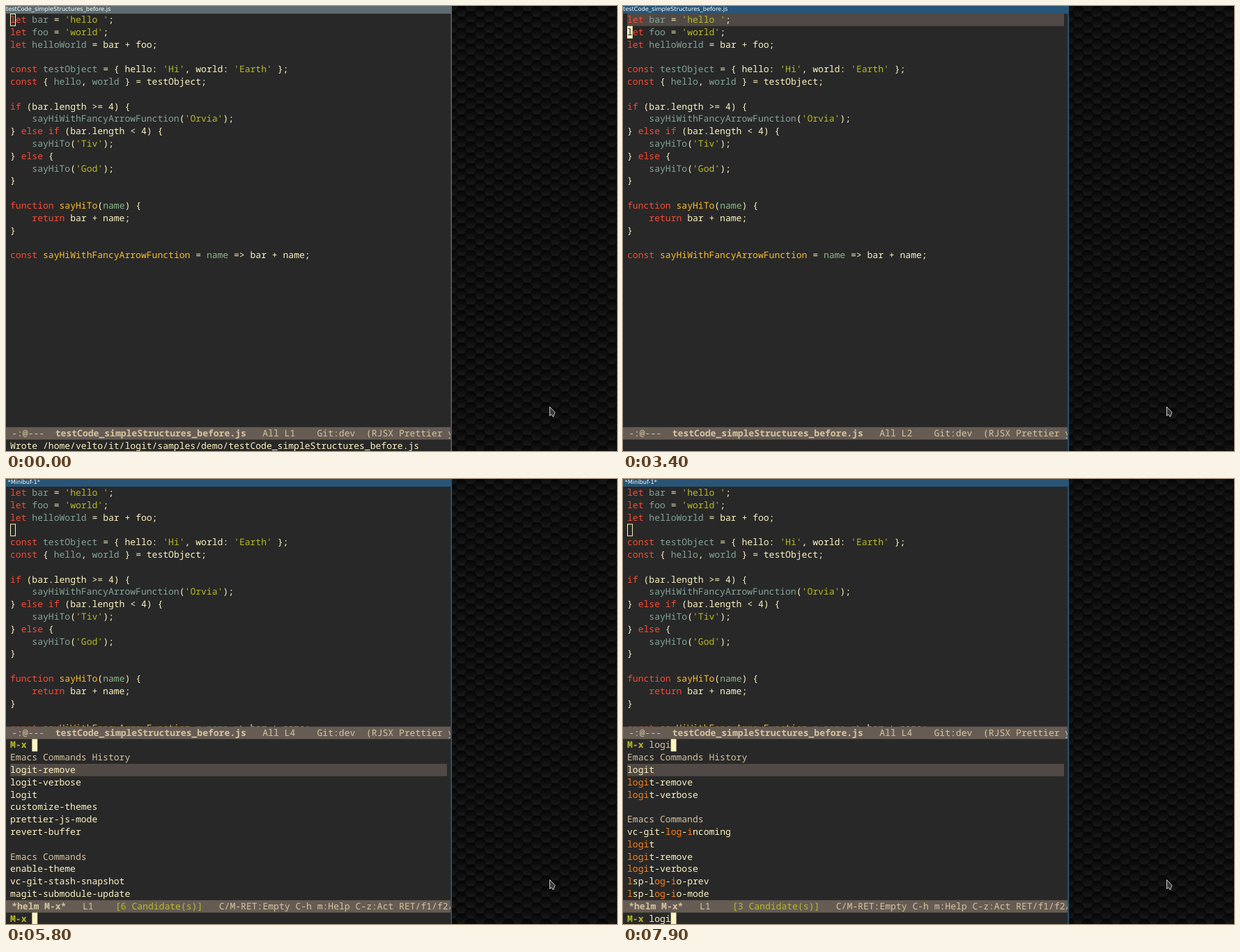
Write an HTML page that moves like this. It is 877x639 px and loops after 8000 ms.

```html
<!DOCTYPE html>
<html lang="en">
<head>
<meta charset="utf-8">
<title>Editor session</title>
<style>
  html, body { margin: 0; width: 100%; height: 100%; overflow: hidden; background: #282828; }
  svg { display: block; width: 877px; height: 639px; }
  text { font: 13.055px "Noto Sans Mono", monospace; fill: #fdf4c1; white-space: pre; text-rendering: geometricPrecision; }
  .title { font: 8.22px "DejaVu Sans", sans-serif; fill: #fff; }
  .k { fill: #fb4933; }
  .v { fill: #83a598; }
  .s { fill: #b8bb26; }
  .f { fill: #fabd2f; }
  .p { fill: #8db885; }
  .m { fill: #fe8019; }
  .dim { fill: #d5c4a1; }
  .dark { fill: #282828; }
  .b { font-weight: 700; }
</style>
</head>
<body>
<svg id="stage" viewBox="0 0 877 639">
  <defs>
    <linearGradient id="tile" x1="0" y1="0" x2="0" y2="1">
      <stop offset="0" stop-color="#040404"/>
      <stop offset="1" stop-color="#1a1a1a"/>
    </linearGradient>
    <path id="hex" d="M-9 0L-4.5 -7.8H4.5L9 0L4.5 7.8H-4.5Z" fill="url(#tile)" stroke="#060606" stroke-width=".8"/>
    <pattern id="comb" x="640" width="27" height="15.6" patternUnits="userSpaceOnUse">
      <rect width="27" height="15.6" fill="#070707"/>
      <use href="#hex" x="13.5" y="7.8"/>
      <use href="#hex"/><use href="#hex" x="27"/>
      <use href="#hex" y="15.6"/><use href="#hex" x="27" y="15.6"/>
    </pattern>
  </defs>
  <rect width="640" height="639" fill="#282828"/>
  <g id="editor"></g>
  <rect x="638" width="239" height="639" fill="#282828"/>
  <g id="frame"></g>
  <rect x="640" width="237" height="639" fill="url(#comb)"/>
  <path d="M780.5 575.5V588.5L783 586.5L785.5 590L788 583.5Z" fill="#3a3a3a" stroke="#c8c8c8"/>
</svg>
<script>
const LOOP = 8000, CW = 7.833, LH = 17.8, LEFT = 6, TOP = 11;
const HELM = 373.4, BAR = 604.8, MINI = 622.6;
const FILE = 'testCode_simpleStructures_before.js';

const code = `[k let] [v bar] = [s 'hello '];
[k let] [v foo] = [s 'world'];
[k let] [v helloWorld] = bar + foo;

[k const] [v testObject] = { hello: [s 'Hi'], world: [s 'Earth'] };
[k const] { [v hello], [v world] } = testObject;

[k if] (bar.length >= 4) {
    [v sayHiWithFancyArrowFunction]([s 'Orvia']);
} [k else if] (bar.length < 4) {
    [v sayHiTo]([s 'Tiv']);
} [k else] {
    [v sayHiTo]([s 'God']);
}

[k function] [f sayHiTo]([p name]) {
    [k return] bar + name;
}

[k const] [f sayHiWithFancyArrowFunction] = [p name] => bar + name;`.split('\n');

const rect = (x, y, w, h, fill) =>
  `<rect x="${x}" y="${y}" width="${w}" height="${h}" fill="${fill}"/>`;
const span = (cls, s) => `<tspan class="${cls}">${s}</tspan>`;
const text = (x, top, s, cls = '') => {
  const body = s.replace(/</g, '&lt;').replace(/\[([a-z]) ([^\]]*)\]/g, (_, c, t) => span(c, t));
  return `<text x="${x}" y="${top + 13}" class="${cls}">${body}</text>`;
};
const col = n => LEFT + n * CW;
const row = n => TOP + n * LH;
const during = (from, to, body) => `<g data-from="${from}" data-to="${to}">${body}</g>`;

const block = (x, top) => rect(x, top, CW, LH, '#fdf4c1');
const hollow = top =>
  `<rect x="6.5" y="${top + .5}" width="7" height="${LH - 1}" fill="none" stroke="#fdf4c1"/>`;
const band = (top, lines) => rect(LEFT, top, 627, lines * LH, '#504945');

const modeline = (top, line) => rect(0, top, 638, LH, '#665c54') +
  text(.3, top, ` -:@---  [b ${FILE}]   All L${line}    Git:dev  (RJSX Prettier yas)`, 'dim');

const cursorAt = line => block(LEFT, row(line)) +
  (code[line] ? text(LEFT, row(line), 'l', 'dark') : '');

// Marks the characters of the query, in order, inside a candidate.
function fuzzy(name, query) {
  let i = 0;
  return [...name].map(c => i < query.length && c === query[i] ? (i++, `[m ${c}]`) : c).join('');
}

function prompt(from, to, query) {
  const line = top => text(LEFT, top, 'M-x', 's b') + block(col(4 + query.length), top);
  return during(from, to,
    line(HELM) + text(col(4), HELM, query, 'dim') +
    line(MINI) + text(col(4), MINI, query));
}

function candidates(from, to, query, history, commands) {
  const at = n => HELM + n * LH;
  const item = (name, n) => text(LEFT, at(n), n === 2 ? name : fuzzy(name, query));
  const next = history.length + 3;
  return during(from, to,
    text(LEFT, at(1), 'Emacs Commands History', 'dim') +
    history.map((s, i) => item(s, i + 2)).join('') +
    text(LEFT, at(next), 'Emacs Commands', 'dim') +
    commands.map((s, i) => item(s, next + 1 + i)).join('') +
    text(.3 + 20 * CW, BAR, `[${history.length} Candidate(s)]`, 's'));
}

const logs = ['logit', 'logit-remove', 'logit-verbose'];

const helm = during(5800, LOOP,
  rect(0, 355.6, 640, 284, '#282828') + modeline(355.6, 4) + band(HELM + 2 * LH, 1) +
  rect(0, BAR, 638, LH, '#665c54') +
  text(.3, BAR, ' [b *helm M-x*]   L1', 'dim') +
  text(.3 + 39 * CW, BAR, 'C/M-RET:Empty C-h m:Help C-z:Act RET/f1/f2/f-n:NthAct', 'dim') +
  prompt(5800, 6700, '') +
  prompt(6700, 6900, 'l') +
  prompt(6900, 7800, 'lo') +
  prompt(7800, 7900, 'log') +
  prompt(7900, LOOP, 'logi') +
  candidates(5800, 6800, '',
    ['logit-remove', 'logit-verbose', 'logit', 'customize-themes', 'prettier-js-mode', 'revert-buffer'],
    ['enable-theme', 'vc-git-stash-snapshot', 'magit-submodule-update']) +
  candidates(6800, 7000, 'l', logs, ['logit', 'lgrep', 'locate', 'lower-frame', 'logit-remove', 'logit-verbose']) +
  candidates(7000, 7800, 'lo', logs, ['logit', 'locate', 'lower-frame', 'logit-remove', 'logit-verbose', 'local-set-key']) +
  candidates(7800, 7900, 'log', logs, ['logit', 'magit-log', 'logit-remove', 'logit-verbose', 'vc-print-root-log', 'magit-log-buffer-file-popup']) +
  candidates(7900, LOOP, 'logi', logs, ['vc-git-log-incoming', 'logit', 'logit-remove', 'logit-verbose', 'lsp-log-io-prev', 'lsp-log-io-mode']));

// Line the cursor stands on, with the region above it selected.
const moves = [[900, 3400, 0], [3400, 3800, 1], [3800, 4600, 2], [4600, 5800, 3]];

document.getElementById('editor').innerHTML =
  moves.map(([a, b, n]) => during(a, b, band(TOP, n))).join('') +
  code.map((s, i) => text(LEFT, row(i), s)).join('') +
  during(0, 900, hollow(TOP) + modeline(BAR, 1)) +
  moves.map(([a, b, n]) => during(a, b, cursorAt(n) + modeline(BAR, n + 1))).join('') +
  during(0, 3400, text(LEFT, MINI, `Wrote /home/velto/it/logit/samples/demo/${FILE}`)) +
  during(5800, LOOP, hollow(row(3))) + helm;

const chrome = (fill, edge) => rect(638.6, 0, 1.2, 639, edge) + rect(0, 0, 640, TOP, fill);
const title = s => `<text x="0" y="6.5" class="title">${s}</text>`;
document.getElementById('frame').innerHTML =
  during(0, 900, chrome('#5f6c6f', '#6c787b')) +
  during(900, LOOP, chrome('#285577', '#346f99')) +
  during(0, 5800, title(FILE)) +
  during(5800, LOOP, title(' *Minibuf-1*'));

const layers = [...document.querySelectorAll('[data-from]')].map(el =>
  ({ el, from: +el.dataset.from, to: +el.dataset.to }));
const start = performance.now();

function draw() {
  const t = (performance.now() - start) % LOOP;
  for (const { el, from, to } of layers) el.style.display = t >= from && t < to ? '' : 'none';
  requestAnimationFrame(draw);
}
draw();
</script>
</body>
</html>
```
